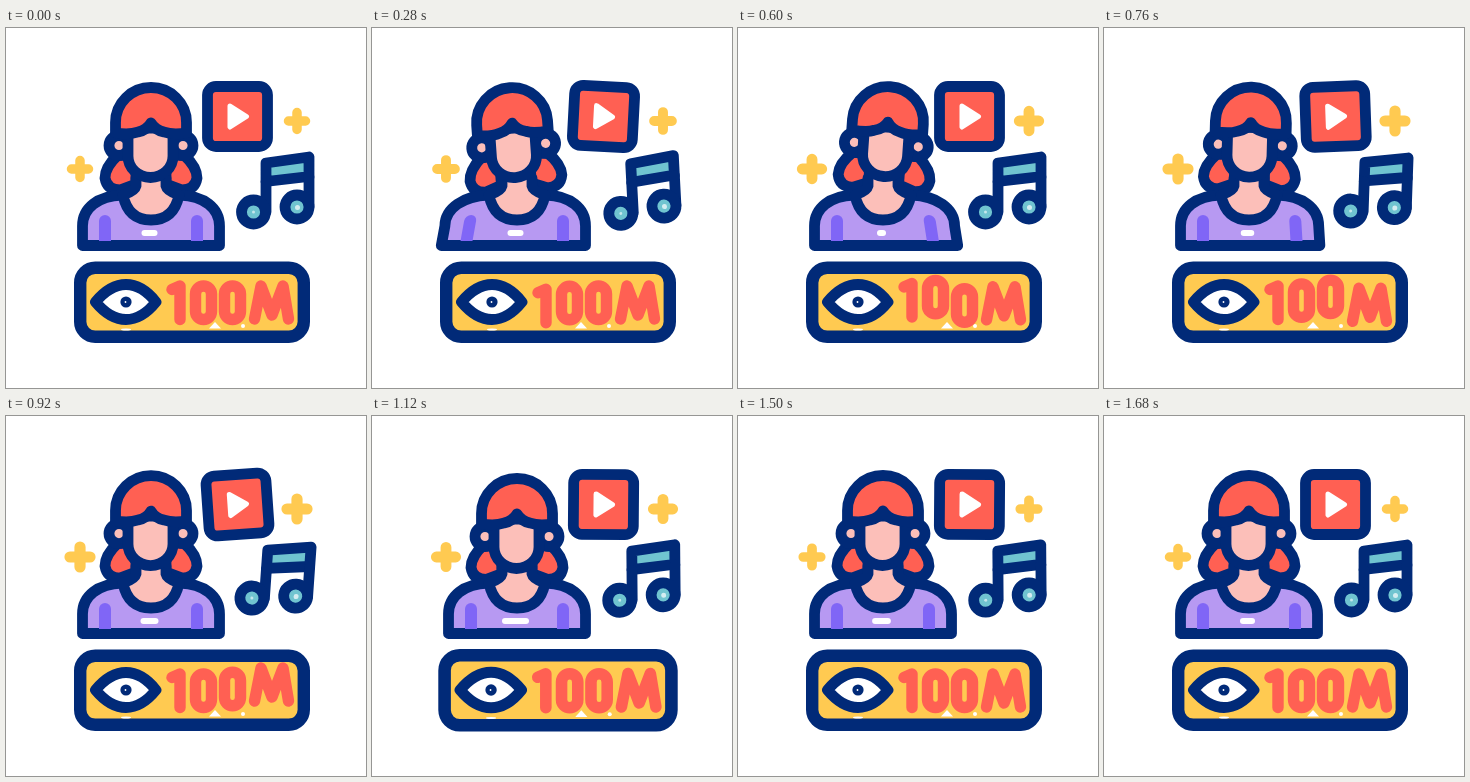
An HTML page for the animation above (1700 ms loop, 360 px wide and 360 px high).

```html
<!DOCTYPE html>
<html lang="en">
<head>
<meta charset="utf-8">
<title>100M views</title>
<style>
  html, body { margin: 0; width: 100%; height: 100%; overflow: hidden; background: #fff; }
  svg { display: block; width: 100vw; height: 100vh; }
  .line { stroke: #012a78; stroke-width: 10.8; stroke-linecap: round; stroke-linejoin: round; fill: none; }
  .red { fill: #ff6053; }
  .skin { fill: #fcbfb9; }
  .lilac { fill: #b799f2; }
  .violet { fill: #8066f6; }
  .yellow { fill: #ffca51; }
  .teal { fill: #70c4d0; }
  .white { fill: #fff; }
  .navy { fill: #012a78; }
  .digit { fill: none; stroke: #ff6053; stroke-width: 11.4; stroke-linecap: round; stroke-linejoin: round; }
</style>
</head>
<body>
<svg viewBox="0 0 360 360" role="img" aria-label="100M views">
  <defs>
    <path id="star" d="M0-8.500V8.500M-8.500 0H8.500" stroke="#ffca51" stroke-width="9.500" stroke-linecap="round"/>
  </defs>

  <use href="#star" class="star" data-at="291 93"/>
  <use href="#star" class="star" data-at="74 141"/>

  <g id="buns">
    <path class="line red" d="M112 127Q99 139 99 150Q101 162 114 162L130 156V127Z"/>
    <path class="line red" d="M178 127Q191 139 191 150Q189 162 176 162L160 156V127Z"/>
  </g>
  <path id="torso" class="line lilac"/>
  <path id="leftSleeve" class="violet" d="M93 213V193a6 6 0 0 1 12 0V213Z"/>
  <path id="rightSleeve" class="violet" d="M185 213V193a6 6 0 0 1 12 0V213Z"/>
  <path class="line skin" d="M130 150V158Q129 163 117 167Q122 192 145 192Q168 192 173 167Q161 163 160 158V150"/>
  <rect id="badge" class="white" y="202" height="6" rx="3"/>
  <g id="head">
    <circle class="line skin" cx="113" cy="117.500" r="10"/>
    <circle class="line skin" cx="177" cy="117.500" r="10"/>
    <path class="line skin" d="M122 100V128a22.500 21.500 0 0 0 45 0V100Z"/>
    <path class="line red" d="M109.500 105V94.500a35.500 35 0 0 1 71 0V105Q166 107 158 104Q149 102 145 95Q141 102 132 104Q124 107 109.500 105Z"/>
  </g>

  <g id="card">
    <rect class="line red" x="201.500" y="58.500" width="60" height="60" rx="8.500"/>
    <path d="M224 78 240.500 88.500 224 99Z" fill="#fff" stroke="#fff" stroke-width="5" stroke-linejoin="round"/>
  </g>

  <g id="note">
    <path class="line teal" d="M260 135 303 129V148.500L260 153.500Z"/>
    <path class="line" d="M260 154V184M303 149V179"/>
    <circle class="line teal" cx="247.500" cy="184" r="12"/>
    <circle class="line teal" cx="291" cy="179" r="12"/>
    <circle class="white" cx="247.500" cy="184" r="1.500" opacity=".6"/>
    <circle class="white" cx="291.500" cy="179.500" r="2.500" opacity=".7"/>
  </g>

  <g id="panel">
    <rect class="line yellow" x="74.200" y="239.700" width="223.600" height="69.100" rx="15" style="stroke-width:12.4"/>
    <path class="line white" d="M89.500 274Q104 256.500 120 256.500T150 274Q136 291.500 120 291.500T89.500 274Z"/>
    <circle class="navy" cx="120" cy="274" r="5.600"/>
    <circle class="white" cx="119.500" cy="274" r=".9"/>
    <ellipse class="white" cx="120" cy="301.500" rx="5" ry="1"/>
    <path class="white" d="M203 300.500 209 294 215 300.500Z"/>
    <circle class="white" cx="237" cy="298" r="2"/>
    <path class="digit" d="M166 261.500 174 258V291.500"/>
    <rect class="digit" x="189.500" y="258" width="16" height="33.500" rx="8"/>
    <rect class="digit" x="218.500" y="258" width="16" height="33.500" rx="8"/>
    <path class="digit" d="M248.500 291 255 258 266 287 277 258 282.500 291"/>
  </g>
</svg>
<script>
const LOOP = 1700;
const $ = id => document.getElementById(id);
const move = (el, value) => el.setAttribute('transform', value);
const stars = document.querySelectorAll('.star');
const digits = document.querySelectorAll('.digit');

// Eased value between [time, value] keys, held outside them.
function key(t, ...keys) {
  if (t <= keys[0][0]) return keys[0][1];
  for (let i = 1; i < keys.length; i++) {
    const [t0, a] = keys[i - 1], [t1, b] = keys[i];
    if (t < t1) return a + (b - a) * (1 - Math.cos(Math.PI * (t - t0) / (t1 - t0))) / 2;
  }
  return keys[keys.length - 1][1];
}

// Slants a sleeve so that its hem moves sideways by dx.
function slant(el, dx) {
  const k = dx / 28;
  move(el, `matrix(1 0 ${k} 1 ${-k * 188} 0)`);
}

function draw(t) {
  const twinkle = 1 + 0.09 * (1 - Math.cos(2 * Math.PI * t / LOOP));
  stars.forEach(s => move(s, `translate(${s.dataset.at}) scale(${twinkle})`));

  const tilt = key(t, [0, 0], [280, -4], [600, 4], [880, 0]);
  const nod = key(t, [300, 0], [600, -1], [900, 0], [1120, 3], [1360, 0.7], [1500, 0]);
  move($('head'), `translate(0 ${nod}) rotate(${tilt} 145 165)`);
  move($('buns'), `translate(0 ${nod / 2}) rotate(${tilt} 145 165)`);

  // The hem on the leaning side flares outwards.
  const left = Math.max(0, -tilt) * 1.8, right = Math.max(0, tilt) * 1.55;
  const l = 76.5 - left, r = 213.5 + right;
  $('torso').setAttribute('d',
    `M${l} 217.500L${l + left / 2} 198C${l + left / 2} 180 92 168 116 167H174C198 168 ${r - right / 2} 180 ${r - right / 2} 198L${r} 217.500Z`);
  slant($('leftSleeve'), -left * 0.7);
  slant($('rightSleeve'), right * 0.7);
  const badge = key(t, [0, 16], [280, 16], [600, 9], [920, 18], [1120, 27], [1360, 21], [LOOP, 15]);
  $('badge').setAttribute('x', 143.5 - badge / 2);
  $('badge').setAttribute('width', badge);

  const sway = key(t, [0, 0], [280, 3], [600, 0], [920, -4], [1200, 1.5], [1360, 1.2], [1600, 0]);
  move($('card'), `rotate(${sway} 231.500 88.500)`);
  move($('note'), `rotate(${-sway} 275 160)`);

  const pulse = key(t, [1075, 1], [1245, 1.085], [1415, 1]);
  move($('panel'), `translate(186 274.500) scale(${pulse}) translate(-186 -274.500)`);
  digits.forEach((d, i) => {
    const hop = key(t - 150 * i, [100, 0], [260, 3.5], [480, -6], [700, 0]);
    move(d, `translate(0 ${hop})`);
  });
}

function frame() {
  draw(performance.now() % LOOP);
  requestAnimationFrame(frame);
}
frame();
</script>
</body>
</html>
```
